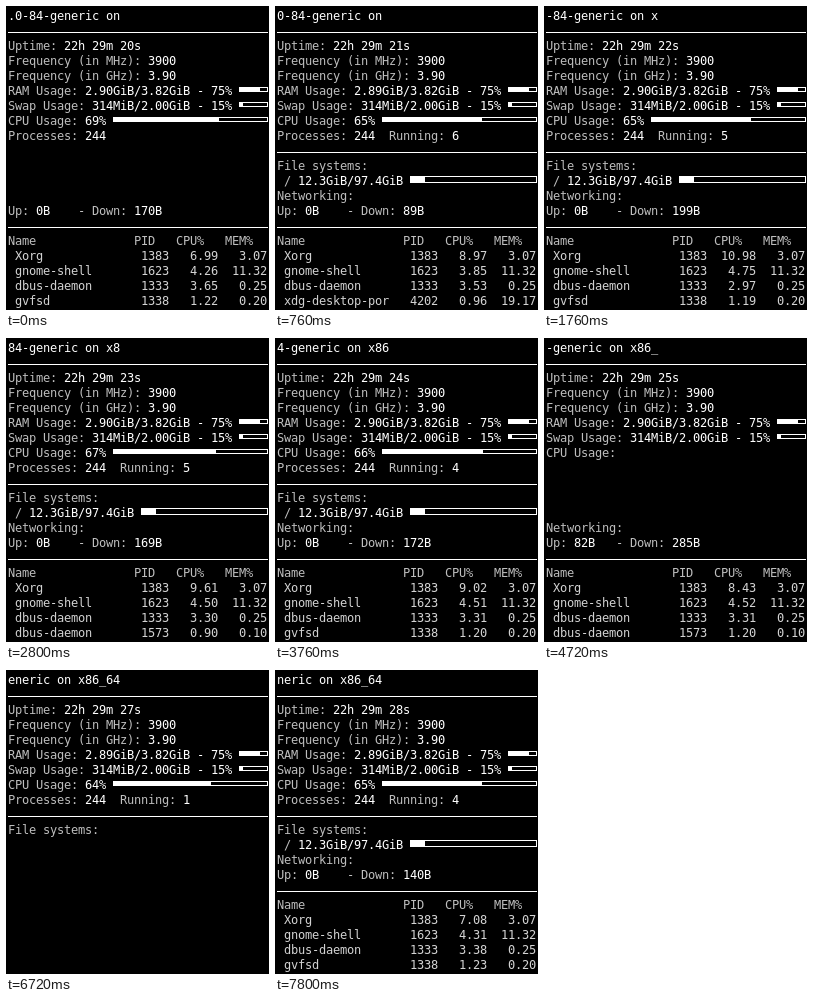
An HTML page with a canvas for the animation above (8 s loop, 263 px wide and 304 px high).

```html
<!DOCTYPE html>
<html lang="en">
<head>
<meta charset="utf-8">
<title>System monitor</title>
<style>
html, body { margin: 0; width: 100%; height: 100%; overflow: hidden; background: #000; }
canvas { display: block; }
</style>
</head>
<body>
<canvas id="stage" width="263" height="304"></canvas>
<script>
const ctx = document.getElementById('stage').getContext('2d', { alpha: false });
const LOOP = 8000, LEFT = 2, RIGHT = 262, CELL = 7, LINE = 15, BASE = 14;
const GREY = '#bebebe', LIGHT = '#d3d3d3', WHITE = '#fff';
const KERNEL = '.0-84-generic on x86_64';

const proc = (name, pid, cpu, mem) => [name, pid, cpu, mem];
const gvfsd = cpu => proc('gvfsd', 1338, cpu, 0.2);
const daemon = cpu => proc('dbus-daemon', 1573, cpu, 0.1);

// One sample per second; cpu3 holds Xorg, gnome-shell and dbus-daemon.
const samples = {
  20: { ram: 2.90, cpu: 69, run: 5, up: 0, down: 170, cpu3: [6.99, 4.26, 3.65], last: gvfsd(1.22) },
  21: { ram: 2.89, cpu: 65, run: 6, up: 0, down: 89, cpu3: [8.97, 3.85, 3.53], last: proc('xdg-desktop-por', 4202, 0.96, 19.17) },
  22: { ram: 2.90, cpu: 65, run: 5, up: 0, down: 199, cpu3: [10.98, 4.75, 2.97], last: gvfsd(1.19) },
  23: { ram: 2.90, cpu: 67, run: 5, up: 0, down: 169, cpu3: [9.61, 4.50, 3.30], last: daemon(0.90) },
  24: { ram: 2.90, cpu: 66, run: 4, up: 0, down: 172, cpu3: [9.02, 4.51, 3.31], last: gvfsd(1.20) },
  25: { ram: 2.90, cpu: 66, run: 4, up: 82, down: 285, cpu3: [8.43, 4.52, 3.31], last: daemon(1.20) },
  26: { ram: 2.90, cpu: 65, run: 3, up: 0, down: 160, cpu3: [7.98, 4.45, 3.33], last: daemon(1.21) },
  27: { ram: 2.89, cpu: 64, run: 1, up: 0, down: 148, cpu3: [7.53, 4.38, 3.35], last: gvfsd(1.22) },
  28: { ram: 2.89, cpu: 65, run: 4, up: 0, down: 140, cpu3: [7.08, 4.31, 3.38], last: gvfsd(1.23) }
};

// Start time, second shown, and the unpainted part: [row, column, end row].
const steps = [
  [0, 20, [8, 14, 13]],
  [720, 21, [10, 13, 20]],
  [760, 21],
  [1720, 22, [10, 13, 20]],
  [1760, 22],
  [2800, 23],
  [3720, 24, [15, 0, 20]],
  [3760, 24],
  [4720, 25, [7, 10, 12]],
  [5720, 26],
  [6720, 27, [10, 13, 20]],
  [6760, 27],
  [7800, 28]
];

const colX = col => LEFT + col * CELL;
const rowY = row => BASE + row * LINE;

// Monospace grid: every character sits in its own cell.
function text(row, col, str, color) {
  ctx.fillStyle = color;
  [...str].forEach((ch, i) => {
    if (ch !== ' ') ctx.fillText(ch, colX(col + i), rowY(row));
  });
}

function pair(row, label, value, col = 0) {
  text(row, col, label, GREY);
  text(row, col + label.length + 1, value, WHITE);
}

function rule(row) {
  ctx.fillStyle = WHITE;
  ctx.fillRect(LEFT, rowY(row) - 3, RIGHT - LEFT, 1);
}

function bar(row, col, h, share) {
  const x = colX(col), y = rowY(row) - 6 - h / 2, w = RIGHT - x - 1;
  ctx.strokeStyle = ctx.fillStyle = WHITE;
  ctx.lineWidth = 1;
  ctx.strokeRect(x + 0.5, y + 0.5, w, h);
  ctx.fillRect(x, y, Math.floor(w * share), h);
}

function tableRow(row, [name, pid, cpu, mem]) {
  const cells = (' ' + name).padEnd(18) + String(pid).padStart(5) +
    cpu.toFixed(2).padStart(7) + mem.toFixed(2).padStart(7);
  text(row, 0, cells, LIGHT);
}

function erase([row, col, end]) {
  const top = r => rowY(r) - 12;
  ctx.fillStyle = '#000';
  ctx.fillRect(colX(col), top(row), 263, LINE);
  ctx.fillRect(0, top(row + 1), 263, top(end) - top(row + 1));
}

function draw([, sec, gap]) {
  const s = samples[sec];
  ctx.fillStyle = '#000';
  ctx.fillRect(0, 0, 263, 304);
  ctx.font = '12px "DejaVu Sans Mono", monospace';
  ctx.textBaseline = 'alphabetic';

  text(0, 0, KERNEL.substr(sec - 20, 16), WHITE);
  [1, 9, 14].forEach(rule);
  pair(2, 'Uptime:', `22h 29m ${sec}s`);
  pair(3, 'Frequency (in MHz):', '3900');
  pair(4, 'Frequency (in GHz):', '3.90');
  pair(5, 'RAM Usage:', `${s.ram.toFixed(2)}GiB/3.82GiB - 75%`);
  bar(5, 33, 4, 0.755);
  pair(6, 'Swap Usage:', '314MiB/2.00GiB - 15%');
  bar(6, 33, 4, 0.153);
  pair(7, 'CPU Usage:', s.cpu + '%');
  bar(7, 15, 4, s.cpu / 100);
  pair(8, 'Processes:', '244');
  pair(8, 'Running:', String(s.run), 16);

  text(10, 0, 'File systems:', GREY);
  pair(11, ' /', '12.3GiB/97.4GiB');
  bar(11, 19, 6, 12.3 / 97.4);
  text(12, 0, 'Networking:', GREY);
  pair(13, 'Up:', s.up + 'B');
  pair(13, '- Down:', s.down + 'B', 10);

  text(15, 0, 'Name              PID   CPU%   MEM%', GREY);
  tableRow(16, proc('Xorg', 1383, s.cpu3[0], 3.07));
  tableRow(17, proc('gnome-shell', 1623, s.cpu3[1], 11.32));
  tableRow(18, proc('dbus-daemon', 1333, s.cpu3[2], 0.25));
  tableRow(19, s.last);

  if (gap) erase(gap);
}

const start = performance.now();
function tick() {
  const t = Math.max(0, performance.now() - start) % LOOP;
  draw(steps.filter(step => step[0] <= t).pop());
  requestAnimationFrame(tick);
}
tick();
</script>
</body>
</html>
```
